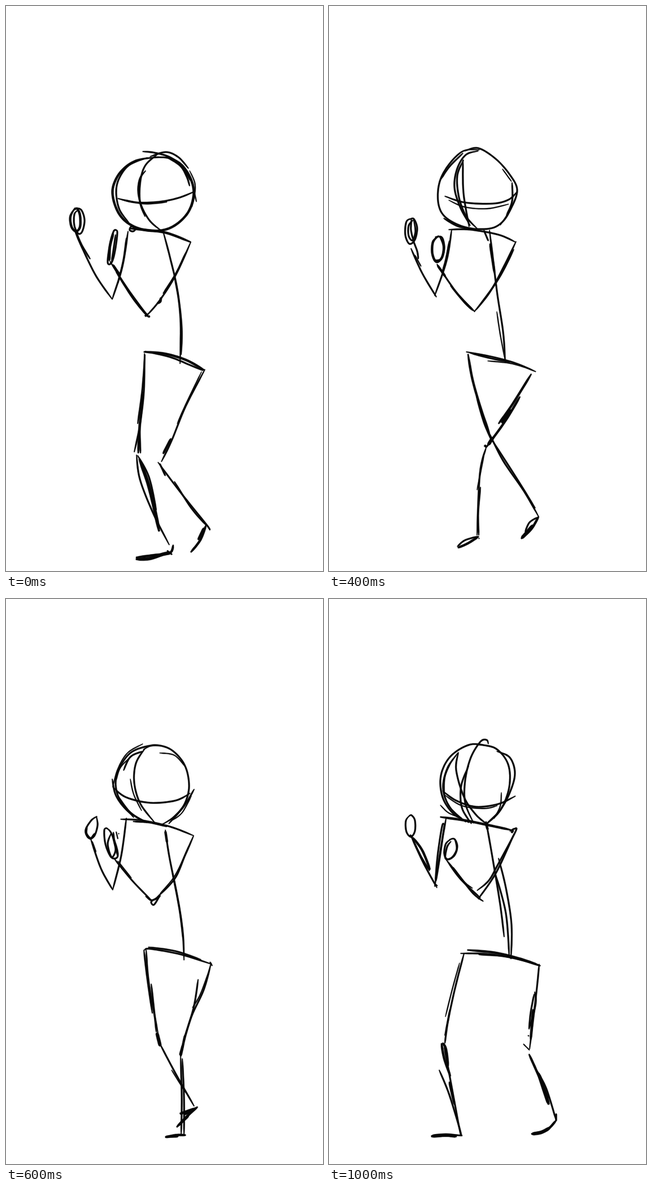
These frames come from a looping animation (561 by 998 pixels, 1200 ms). An HTML page:

```html
<!DOCTYPE html>
<html lang="en">
<head>
<meta charset="utf-8">
<title>Sketch walk</title>
<style>
html, body { margin: 0; width: 100%; height: 100%; overflow: hidden; background: #fff; }
svg { display: block; width: 100%; height: 100%; }
path { fill: none; stroke: #060606; stroke-width: 3.2; stroke-linecap: round; stroke-linejoin: round; }
.t { stroke-width: 2.3; }
.b { stroke-width: 4.4; }
.c { stroke-width: 6.2; }
path.ink { fill: #060606; stroke-width: .5; }
.pose { visibility: hidden; animation: show 1.2s step-end calc(var(--i) * .2s) infinite; }
@keyframes show {
  0% { visibility: visible; }
  16.6666%, 100% { visibility: hidden; }
}
</style>
</head>
<body>
<svg viewBox="0 0 561 998">
<g class="pose" style="--i:0">
  <path class="b" d="M270 267 230 273 203 293 189 322 193 352 208 377 235 393 270 397 298 388 322 365 332 335 328 308 312 282 290 269 262 267"/>
  <path d="M250 268 218 281 200 305 195 330 201 360 217 382"/>
  <path d="M242 257 262 259 290 267 312 284 326 308"/>
  <path d="M255 266 283 258 305 267 323 287"/>
  <path d="M283 266 308 282 320 302 325 318"/>
  <path class="t" d="M325 291 334 312 334 332 329 355"/>
  <path class="t" d="M331 318 337 346"/>
  <path d="M247 291 237 305 234 328 240 354 255 380 275 397"/>
  <path d="M268 262 247 281 238 308 237 345 246 372"/>
  <path d="M198 340 230 347 270 346 305 339 333 328"/>
  <path d="M205 342 245 349 285 346"/>
  <path class="b" d="M220 393 250 396 285 401 327 417"/>
  <path d="M227 391 221 390 219 396 225 398 229 394 225 391"/>
  <path d="M278 398 290 443 303 500 309 560 308 632"/>
  <path d="M298 478 306 520 311 570 310 616"/>
  <path d="M327 417 300 476 272 520 249 547"/>
  <path d="M318 436 301 472 278 508"/>
  <path class="b" d="M274 515 273 522 268 525"/>
  <path class="b" d="M246 548 251 544"/>
  <path d="M216 398 206 460 188 518"/>
  <path d="M213 410 208 448 198 490"/>
  <path d="M188 518 160 478 137 432 122 398"/>
  <path d="M124 399 134 422 149 447"/>
  <path class="b" d="M122 357 114 372 116 390 124 398 131 390 131 370 126 358 121 360"/>
  <path d="M122 357 133 360 139 378 135 398 128 402 121 388 121 368 128 360"/>
  <path d="M254 547 249 545 215 499 184 451"/>
  <path d="M251 549 225 517 195 470"/>
  <path class="b" d="M189 457 202 476"/>
  <path d="M197 397 191 397 184 420 180 453 187 453 193 432 197 400 193 396"/>
  <path class="b" d="M190 402 184 425 183 450"/>
  <path d="M194 404 190 432 187 452"/>
  <path class="b" d="M244 611 280 614 318 625 351 643"/>
  <path d="M246 610 290 620 325 634 349 644"/>
  <path d="M245 614 244 680 237 740 227 788"/>
  <path d="M246 616 241 680 233 738"/>
  <path class="b" d="M243 682 237 738 234 790"/>
  <path d="M236 735 238 790"/>
  <path d="M352 642 318 707 293 768 275 805"/>
  <path class="t" d="M346 646 318 704 303 738"/>
  <path class="b" d="M292 764 278 791"/>
  <path class="c" d="M236 800 251 842 262 885 271 928"/>
  <path d="M231 793 237 836 260 895 289 952"/>
  <path d="M233 794 253 832 266 890"/>
  <path class="b" d="M296 952 290 966 262 970 230 974"/>
  <path class="c" d="M230 977 254 976 279 968 292 966"/>
  <path d="M285 962 294 969"/>
  <path d="M269 806 308 858 354 915 361 926"/>
  <path d="M272 808 282 830"/>
  <path d="M298 840 328 887 354 917"/>
  <path class="b" d="M354 917 344 943 327 965"/>
  <path class="b" d="M350 922 340 943"/>
</g>
<g class="pose" style="--i:1">
  <path d="M197 335 198 308 212 282 238 261 265 255 295 265 318 288 328 320 324 352 308 380 280 392 250 390 222 376 203 353 197 328"/>
  <path d="M187 330 198 355 222 378 262 392"/>
  <path d="M204 292 233 267 272 261"/>
  <path d="M203 303 220 276 245 263"/>
  <path class="t" d="M290 259 310 270 326 290"/>
  <path d="M217 379 240 389 275 395 302 391 320 375"/>
  <path d="M327 330 324 358 312 386"/>
  <path d="M254 264 234 285 229 320 236 355 253 385"/>
  <path d="M265 262 245 280 237 310 239 346"/>
  <path d="M230 327 240 361 256 388"/>
  <path d="M199 340 230 347 270 347 310 340 338 327"/>
  <path d="M216 396 260 398 300 407 331 415"/>
  <path d="M250 396 290 402"/>
  <path class="b" d="M284 403 290 440 296 490"/>
  <path d="M293 465 297 510 299 567"/>
  <path d="M295 488 306 540 311 590 313 625"/>
  <path d="M301 508 311 555 314 615"/>
  <path d="M331 414 310 460 290 493 264 525"/>
  <path d="M322 432 297 482 276 514"/>
  <path d="M271 520 258 541 251 549 249 543 256 541"/>
  <path d="M255 545 227 512 196 450"/>
  <path class="t" d="M207 470 226 498"/>
  <path d="M214 405 204 408 193 432 192 453 200 456 210 437 214 412 209 404"/>
  <path class="b" d="M198 448 202 459"/>
  <path d="M221 398 209 455 196 503 187 518"/>
  <path d="M213 430 206 470 196 500"/>
  <path d="M188 518 167 484 152 443 142 404"/>
  <path d="M146 412 160 457 184 513"/>
  <path class="b" d="M142 403 146 413"/>
  <path d="M143 364 136 376 137 394 144 405 151 398 153 378 148 365 142 365"/>
  <path class="t" d="M140 366 149 369 153 385 147 402"/>
  <path class="b" d="M240 614 275 618 310 625"/>
  <path d="M285 616 325 628 358 645"/>
  <path d="M244 616 290 624 327 637"/>
  <path class="t" d="M350 651 360 642M360 642 361 648"/>
  <path d="M240 616 243 660 256 712 285 790"/>
  <path d="M247 620 256 680 270 740 287 795"/>
  <path d="M250 628 243 634 245 668 261 716 272 745"/>
  <path class="b" d="M358 645 312 692 250 755"/>
  <path class="b" d="M337 667 300 708 262 748"/>
  <path d="M345 662 300 714 258 758"/>
  <path d="M297 698 270 726 249 759"/>
  <path d="M253 738 268 764 289 794"/>
  <path d="M248 752 249 764 260 755"/>
  <path class="b" d="M249 756 258 798 269 837"/>
  <path d="M263 815 277 862 303 911"/>
  <path class="t" d="M257 765 268 808"/>
  <path d="M266 835 280 875 298 902"/>
  <path class="b" d="M302 902 275 917 242 927"/>
  <path class="b" d="M241 926 255 926"/>
  <path d="M297 898 302 907"/>
  <path d="M289 784 308 838 322 882 333 930"/>
  <path d="M292 790 312 842 326 895"/>
  <path class="t" d="M291 786 295 805"/>
  <path class="b" d="M334 930 343 943 336 961"/>
  <path d="M343 942 318 952 296 961"/>
  <path class="c" d="M290 963 315 961 340 962"/>
  <path d="M333 966 338 951"/>
</g>
<g class="pose" style="--i:2">
  <path d="M266 254 238 256 213 279 196 310 193 345 203 370 230 387 262 394 295 390 317 368 326 335"/>
  <path d="M237 260 213 284 198 306"/>
  <path d="M240 256 264 251 295 270 320 298 333 325 322 358 303 387"/>
  <path d="M203 375 228 389 255 394"/>
  <path d="M264 256 242 263 227 287 222 320 232 355 250 388"/>
  <path d="M237 272 238 330 248 390"/>
  <path d="M238 272 227 300 230 338 243 372 262 393"/>
  <path d="M205 336 240 347 290 349 318 342 333 328"/>
  <path class="t" d="M212 343 240 355 280 358 318 350"/>
  <path class="t" d="M307 288 323 310"/>
  <path d="M324 312 324 345 314 370"/>
  <path d="M212 395 250 395 300 404 330 417"/>
  <path d="M274 396 282 415"/>
  <path d="M284 396 290 445 298 510 308 575 312 630"/>
  <path class="b" d="M285 420 293 472"/>
  <path class="t" d="M297 540 303 580 312 627"/>
  <path d="M331 416 312 455 285 505 257 540"/>
  <path d="M327 430 300 482 261 536"/>
  <path d="M258 540 225 505 191 456"/>
  <path class="b" d="M192 458 206 478"/>
  <path d="M215 494 240 524 255 538"/>
  <path class="b" d="M194 406 184 417 183 438 190 452 200 444 203 424 196 407"/>
  <path d="M188 408 200 409 204 428 198 447 187 449"/>
  <path d="M217 396 208 450 187 512"/>
  <path d="M213 415 207 447 200 472"/>
  <path d="M190 514 165 472 145 428"/>
  <path d="M148 412 156 433 158 447"/>
  <path class="t" d="M152 440 163 460"/>
  <path d="M147 375 137 381 135 404 142 420 152 413 156 392 150 376 143 377"/>
  <path d="M149 378 141 388 141 406 148 414 153 398 150 378"/>
  <path d="M146 377 145 395 149 413"/>
  <path d="M243 611 290 620 330 631 366 646"/>
  <path d="M250 613 285 622 320 629"/>
  <path class="t" d="M281 627 320 631 352 640"/>
  <path class="b" d="M246 615 254 660 269 712 284 755"/>
  <path d="M261 690 274 735 288 768"/>
  <path class="t" d="M270 722 280 748"/>
  <path class="b" d="M358 650 325 703 300 738"/>
  <path class="b" d="M338 690 312 733 278 780"/>
  <path class="c" d="M322 713 306 737"/>
  <path class="c" d="M290 762 282 775"/>
  <path class="b" d="M275 776 279 779"/>
  <path d="M284 755 308 803 345 857 371 902"/>
  <path d="M288 766 325 823 365 887"/>
  <path class="b" d="M371 902 358 924 340 941"/>
  <path class="c" d="M361 917 350 930 341 940"/>
  <path d="M370 903 355 912 347 929"/>
  <path d="M278 780 267 826 262 935"/>
  <path class="t" d="M274 795 262 855"/>
  <path d="M268 850 264 895 265 935"/>
  <path class="b" d="M265 937 246 949 228 957"/>
  <path d="M263 937 240 944 227 955"/>
  <path class="t" d="M265 940 266 941"/>
</g>
<g class="pose" style="--i:3">
  <path d="M275 259 250 260 220 272 200 300 194 328 203 358 226 386"/>
  <path d="M243 266 262 258 292 266 316 293 324 330 316 362 297 385 275 399"/>
  <path d="M188 318 195 348 217 376 250 395"/>
  <path class="t" d="M242 256 215 272 198 300 189 332"/>
  <path d="M242 269 220 279 208 303"/>
  <path class="t" d="M226 274 203 297 195 320"/>
  <path class="t" d="M272 272 298 276 317 296"/>
  <path d="M333 336 315 366 288 397"/>
  <path class="t" d="M328 348 312 377 296 390"/>
  <path d="M246 264 230 290 227 325 238 362 264 396"/>
  <path class="t" d="M220 318 226 345 240 374"/>
  <path d="M189 332 212 350 255 360 300 356 326 343"/>
  <path d="M198 348 218 375 240 391"/>
  <path d="M203 389 240 391 290 402 332 418"/>
  <path d="M225 393 255 395 285 402"/>
  <path d="M282 408 289 455 305 535 313 590 315 638"/>
  <path class="b" d="M282 410 285 430"/>
  <path d="M294 480 307 548 314 605"/>
  <path d="M332 418 316 455 298 495 264 530"/>
  <path class="t" d="M323 437 300 487 273 520"/>
  <path d="M247 525 257 532 269 528 272 524 262 540 257 535 266 528"/>
  <path d="M257 532 223 497 191 458"/>
  <path class="t" d="M198 463 222 493"/>
  <path d="M177 404 186 413 196 440 197 456 186 456 176 433 174 408 180 405"/>
  <path d="M186 414 180 433 187 456 194 442 188 418"/>
  <path d="M190 412 192 430 198 455"/>
  <path class="t" d="M195 411 198 424M199 414 200 415"/>
  <path d="M213 387 204 453 189 513"/>
  <path d="M189 514 168 476 150 424"/>
  <path d="M152 428 159 447"/>
  <path d="M161 384 151 391 141 408 146 422 156 419 162 400 160 384"/>
  <path class="b" d="M143 402 142 414 150 423 157 414"/>
  <path d="M245 620 256 618 310 628 364 645"/>
  <path d="M252 615 300 622 345 637"/>
  <path class="t" d="M361 641 365 648"/>
  <path d="M244 620 250 670 259 732"/>
  <path d="M248 620 253 680 269 767"/>
  <path d="M257 680 262 725 266 765"/>
  <path class="c" d="M267 766 273 790"/>
  <path d="M272 785 300 838 333 896"/>
  <path class="t" d="M293 832 318 872"/>
  <path class="b" d="M339 897 320 914 302 933"/>
  <path class="c" d="M333 901 315 910"/>
  <path d="M338 898 308 909 326 908 303 931"/>
  <path class="b" d="M323 913 305 930"/>
  <path d="M363 643 350 690 328 738 314 785"/>
  <path class="t" d="M360 655 344 698 330 722"/>
  <path d="M340 672 332 722 314 780"/>
  <path class="b" d="M317 770 309 808"/>
  <path class="b" d="M313 788 308 806"/>
  <path d="M309 808 311 880 310 945"/>
  <path d="M312 812 315 880 315 947"/>
  <path class="b" d="M318 947 300 947 282 951"/>
  <path class="b" d="M282 950 305 949"/>
</g>
<g class="pose" style="--i:4">
  <path d="M308 268 280 259 245 261 214 282 199 315 200 350 217 378 248 396 275 401 303 387 321 355 325 323 313 290 290 270 262 264"/>
  <path d="M264 264 243 272 229 300 227 340 239 374 274 400"/>
  <path d="M200 320 205 295 218 276"/>
  <path class="t" d="M235 264 212 284 203 302"/>
  <path d="M238 298 235 330 243 366 262 392"/>
  <path d="M297 273 320 298 325 330 316 366 294 393"/>
  <path d="M200 350 225 381 262 398 300 391"/>
  <path d="M204 347 235 360 270 363 310 355 337 348"/>
  <path class="t" d="M210 352 250 366 290 361"/>
  <path d="M201 384 250 387 300 398 332 412 343 420"/>
  <path class="b" d="M202 384 209 382"/>
  <path d="M240 390 280 398"/>
  <path d="M280 402 292 465 310 550 320 595 320 630"/>
  <path class="b" d="M284 428 295 480"/>
  <path class="t" d="M305 568 309 600 315 625"/>
  <path d="M299 505 309 565 315 622"/>
  <path d="M333 408 315 448 292 492 261 533"/>
  <path class="t" d="M303 470 290 492 269 512"/>
  <path class="t" d="M333 406 333 414"/>
  <path d="M270 537 258 531 226 499 193 460"/>
  <path d="M195 406 186 417 184 445 191 460 200 456 205 432 201 412 193 406"/>
  <path class="t" d="M198 407 205 425 202 450"/>
  <path d="M208 384 203 430 187 494"/>
  <path d="M196 455 191 480 187 494"/>
  <path d="M194 515 167 468 145 427"/>
  <path d="M148 425 152 440 160 453"/>
  <path class="t" d="M151 431 158 440"/>
  <path d="M124 403 130 398 140 407 147 428 144 437 134 428 124 404"/>
  <path class="b" d="M144 428 149 432"/>
  <path d="M234 619 280 620 325 629 369 648"/>
  <path class="t" d="M275 616 322 627"/>
  <path d="M236 620 223 678 207 752"/>
  <path class="t" d="M236 622 225 658 216 700"/>
  <path d="M226 694 217 728 207 754"/>
  <path d="M206 748 235 810 275 896"/>
  <path d="M208 760 224 793 247 833"/>
  <path class="t" d="M236 818 265 884"/>
  <path class="b" d="M275 896 250 908 222 918"/>
  <path class="b" d="M273 898 241 912"/>
  <path d="M369 645 355 685 347 740 337 798"/>
  <path class="t" d="M355 685 350 708 339 738"/>
  <path class="b" d="M355 684 346 740 340 795"/>
  <path class="b" d="M338 792 339 805"/>
  <path d="M338 795 357 858 382 938"/>
  <path d="M340 800 356 852"/>
  <path class="t" d="M362 883 368 910 379 935"/>
  <path class="b" d="M381 936 365 942 340 941"/>
  <path class="b" d="M352 944 341 941"/>
</g>
<g class="pose" style="--i:5">
  <path d="M285 260 250 257 215 278 198 312 201 350 220 379 248 395"/>
  <path d="M282 256 279 249 268 252 251 280 241 320 241 360 256 396"/>
  <path d="M262 257 295 264 317 292 319 332 304 372 280 397"/>
  <path d="M297 269 320 280 329 308 320 342 302 374 276 399"/>
  <path d="M228 272 209 300 202 335 214 368 242 394"/>
  <path d="M229 271 225 302 239 350 260 381 280 398"/>
  <path class="t" d="M216 288 205 315 204 350"/>
  <path class="t" d="M197 364 212 378 235 387"/>
  <path d="M247 295 234 330 235 368 252 397"/>
  <path d="M201 339 225 356 260 367 300 362 330 348"/>
  <path class="t" d="M203 345 235 365 275 370 298 365"/>
  <path class="t" d="M305 342 303 366 292 388"/>
  <path class="b" d="M197 385 240 391 285 400 322 408"/>
  <path d="M320 410 328 406 330 411 300 467 283 497 262 515"/>
  <path d="M328 414 296 483 264 530"/>
  <path class="b" d="M323 413 326 408"/>
  <path d="M273 534 255 520 231 490 207 460"/>
  <path d="M210 464 233 495 268 528"/>
  <path class="t" d="M220 474 240 500 254 511"/>
  <path d="M218 423 207 432 204 450 210 460 222 453 227 437 222 424 213 425"/>
  <path d="M223 425 226 442 217 457 206 458 209 438 216 428"/>
  <path d="M278 393 289 455 303 540 310 597"/>
  <path d="M300 458 313 510 323 575 322 636"/>
  <path d="M295 487 313 555 319 632"/>
  <path class="b" d="M277 394 281 408"/>
  <path d="M207 388 198 440 187 508"/>
  <path d="M204 398 200 402 192 455 189 497 197 450 204 398"/>
  <path d="M191 510 166 464 145 418"/>
  <path class="b" d="M148 421 165 444 179 478"/>
  <path d="M148 424 163 455 178 480"/>
  <path class="t" d="M186 501 192 507"/>
  <path d="M143 382 136 392 137 411 145 420 152 410 152 391 146 382 141 384"/>
  <path class="b" d="M143 417 147 421"/>
  <path d="M233 626 280 627 330 635 374 648"/>
  <path class="b" d="M245 620 295 625 340 636 374 648"/>
  <path d="M265 628 310 631 350 640"/>
  <path d="M239 626 222 692 205 771"/>
  <path class="t" d="M231 643 218 690 206 738"/>
  <path d="M214 725 209 755 205 785"/>
  <path class="b" d="M199 785 204 812 215 843"/>
  <path class="b" d="M201 784 207 795 211 825"/>
  <path d="M204 792 214 845 233 948"/>
  <path d="M195 832 213 876 235 948"/>
  <path class="b" d="M213 853 222 893"/>
  <path class="c" d="M181 949 207 947 226 949"/>
  <path d="M184 947 210 946 236 948"/>
  <path d="M372 645 367 695 355 795"/>
  <path d="M364 694 366 712 360 740 354 758"/>
  <path class="b" d="M361 725 357 778"/>
  <path d="M363 698 357 730 354 760"/>
  <path class="t" d="M344 786 355 797M352 771 354 772"/>
  <path class="b" d="M354 804 371 842 388 882"/>
  <path d="M368 833 385 866 402 921"/>
  <path class="c" d="M371 838 380 866 389 893"/>
  <path d="M402 909 402 922"/>
  <path class="b" d="M402 921 385 938 358 945"/>
  <path class="c" d="M391 934 376 942 359 945"/>
</g>
</svg>
<script>
const STEPS = 8;

function spline(a, b, c, d, t) {
  return b + t / 2 * (c - a + t * (2 * a - 5 * b + 4 * c - d + t * (3 * (b - c) + d - a)));
}

// Smooth curve through the given points
function curve(pts) {
  const out = [];
  const at = i => pts[Math.max(0, Math.min(pts.length - 1, i))];
  for (let i = 0; i < pts.length - 1; i++) {
    for (let s = 0; s < STEPS; s++) {
      out.push([0, 1].map(k => spline(at(i - 1)[k], at(i)[k], at(i + 1)[k], at(i + 2)[k], s / STEPS)));
    }
  }
  out.push(pts[pts.length - 1]);
  return out;
}

// Outline of a brush stroke with thinner ends
function brush(text, width) {
  const nums = text.match(/\d+/g).map(Number);
  const pts = [];
  for (let i = 0; i < nums.length; i += 2) pts.push([nums[i], nums[i + 1]]);
  const line = curve(pts), last = line.length - 1;
  const left = [], right = [];
  line.forEach(([x, y], i) => {
    const p = line[Math.max(0, i - 1)], q = line[Math.min(last, i + 1)];
    const dx = q[0] - p[0], dy = q[1] - p[1], len = Math.hypot(dx, dy) || 1;
    const end = Math.min(i, last - i) / last;
    const half = (width - .5) / 2 * (.5 + .5 * Math.min(1, end * 7));
    const nx = -dy / len * half, ny = dx / len * half;
    left.push((x + nx).toFixed(1) + " " + (y + ny).toFixed(1));
    right.unshift((x - nx).toFixed(1) + " " + (y - ny).toFixed(1));
  });
  return "M" + left.concat(right).join("L") + "Z";
}

document.querySelectorAll("path").forEach(path => {
  const width = parseFloat(getComputedStyle(path).strokeWidth);
  const strokes = path.getAttribute("d").split("M").slice(1);
  path.setAttribute("d", strokes.map(s => brush(s, width)).join(""));
  path.setAttribute("class", "ink");
});
</script>
</body>
</html>
```
